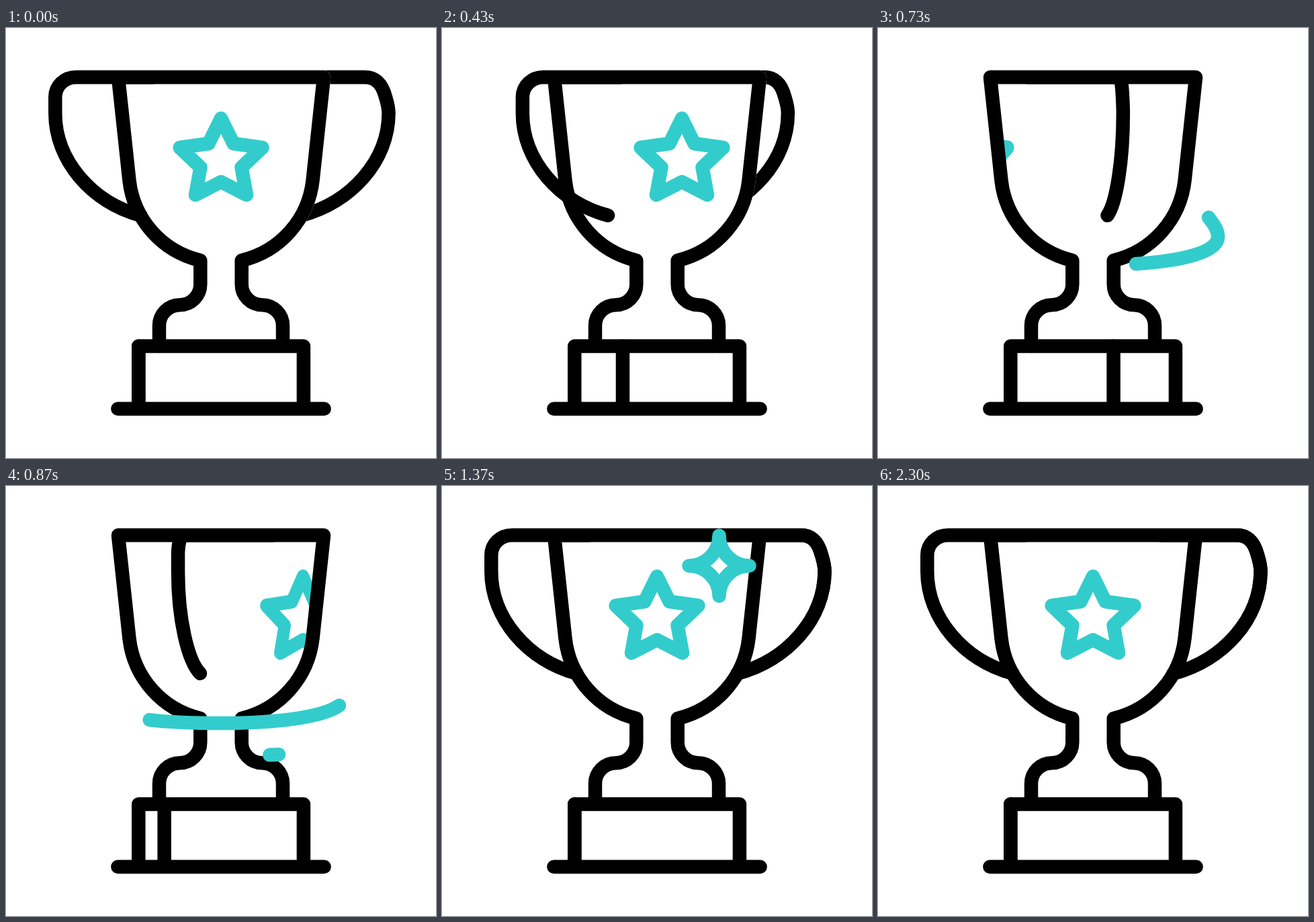
Recreate the animation shown at these times as an HTML page with a canvas. Size 640 by 640 pixels, loop 2.5 s.

```html
<!DOCTYPE html>
<html lang="en">
<head>
<meta charset="utf-8">
<title>Spinning trophy</title>
<style>
html, body { margin: 0; width: 100%; height: 100%; overflow: hidden; background: #fff; }
canvas { display: block; width: 100vmin; height: 100vmin; }
</style>
</head>
<body>
<canvas id="stage" width="640" height="640"></canvas>
<script>
const ctx = document.getElementById('stage').getContext('2d');
const BLACK = '#000', TEAL = '#33cccc', WHITE = '#fff';
const LOOP = 2500, FPS = 30;

// Eased progress of frame f between frames a and b
function ease(f, a, b) {
  const u = Math.min(1, Math.max(0, (f - a) / (b - a)));
  return u * u * (3 - 2 * u);
}
const mix = (a, b, p) => a + (b - a) * p;

const cup = new Path2D(
  'M228 473V443A30.7 30.7 0 0 1 258.6 412.3A30.7 30.7 0 0 0 289.3 381.6V346' +
  'C231 332 190 284 183.5 227L167 73.3H473L456.5 227C450 284 409 332 350.7 346' +
  'V381.6A30.7 30.7 0 0 0 381.4 412.3A30.7 30.7 0 0 1 412 443V473');
const base = new Path2D('M197.3 566.8V473.5H442.9V566.8M166.4 566.8H473.6');
const star = new Path2D(
  'M0 134.5L18.5 172L61.5 178L30.5 207.5L38 248.5L0 229' +
  'L-38 248.5L-30.5 207.5L-61.5 178L-18.5 172Z');
const sparkle = new Path2D(
  'M0 -45A45 45 0 0 0 45 0A45 45 0 0 0 0 45A45 45 0 0 0 -45 0A45 45 0 0 0 0 -45Z');

// Handle poses: x of each point, all sharing the same heights
const handleY = [73.3, 73.3, 73.3, 86, 103, 111, 119, 127, 197, 260, 279];
const leftX = [219, 104, 87, 73.3, 73.3, 73.3, 73.3, 73.3, 73.3, 128, 200.5];
const rightX = [421, 534, 553, 560.5, 565, 567.5, 569.5, 569.5, 569.5, 514, 439.5];
const midX = start => handleY.map((_, i) => i ? 320 : start);

const shift = (xs, d) => xs.map(x => x + d);
const blend = (a, b, p) => a.map((x, i) => mix(x, b[i], p));

function trail(d) {
  const el = document.createElementNS('http://www.w3.org/2000/svg', 'path');
  el.setAttribute('d', d);
  return { path: new Path2D(d), len: el.getTotalLength() };
}
const upper = trail('M492 282C503 296 506 303 506 311C506 340 420 353 320 353' +
  'C215 353 130 342 130 315C130 308 133 302 140 296L148 290');
const lower = trail('M406 399.5Q320 405 234 399.5');

function stroke(path, color) {
  ctx.strokeStyle = color;
  ctx.stroke(path);
}

function drawHandle(xs) {
  const at = i => [xs[i], handleY[i]];
  const p = new Path2D();
  p.moveTo(...at(0));
  p.lineTo(...at(1));
  for (let i = 2; i < 11; i += 3) p.bezierCurveTo(...at(i), ...at(i + 1), ...at(i + 2));
  stroke(p, BLACK);
}

function drawTrail(t, from, to) {
  if (to - from < 0.002) return;
  ctx.save();
  ctx.setLineDash([(to - from) * t.len, t.len * 3]);
  ctx.lineDashOffset = -from * t.len;
  stroke(t.path, TEAL);
  ctx.restore();
}

// Small twist to the right, then a half turn to the left
function pose(f) {
  const twist = ease(f, 7, 12) - ease(f, 12, 17);
  const p = {
    front: shift(leftX, 52 * twist),
    back: shift(rightX, -61 * twist),
    star: 41.3 * twist,
    squash: 1,
    bar: 197.3 + 80 * twist
  };
  if (f < 17 || f >= 30) return p;

  const out = ease(f, 16.6, 24), back = ease(f, 24, 30);
  if (f < 24) {
    p.front = blend(rightX, midX(180), out);
    p.back = shift(leftX, 154 * out);
  } else {
    p.front = blend(midX(460), leftX, back);
    p.back = shift(rightX, -154 * (1 - back));
  }
  p.star = f < 23 ? -256 * ((f - 17) / 6) ** 2 : 244 * (1 - ease(f, 23, 29));
  p.squash = 1 - 0.0009 * Math.abs(p.star);
  p.bar = mix(442.9, 197.3, ease(f, 17, 29));
  return p;
}

function draw(f) {
  const p = pose(f);
  ctx.fillStyle = WHITE;
  ctx.fillRect(0, 0, 640, 640);
  ctx.lineWidth = 20.5;
  ctx.lineCap = ctx.lineJoin = 'round';

  drawHandle(p.back);
  ctx.fill(cup);
  stroke(cup, WHITE);

  ctx.save();
  ctx.clip(cup);
  ctx.translate(320 + p.star, 0);
  ctx.scale(p.squash, 1);
  stroke(star, TEAL);
  ctx.restore();

  stroke(cup, BLACK);
  if (f >= 40) drawHandle(p.back);
  drawHandle(p.front);

  stroke(base, BLACK);
  stroke(new Path2D(`M${p.bar} 473.5V566.8`), BLACK);

  drawTrail(upper, ease(f, 23.5, 35.5), ease(f, 15.5, 31.5));
  drawTrail(lower, ease(f, 31, 39), ease(f, 24, 35.5));

  const size = ease(f, 34, 41) - ease(f, 62, 69);
  if (size > 0) {
    ctx.save();
    ctx.translate(412.5, 118.8);
    ctx.scale(size, size);
    stroke(sparkle, TEAL);
    ctx.restore();
  }
}

const began = performance.now();
function tick() {
  const t = (performance.now() - began) % LOOP;
  draw(Math.floor(t * FPS / 1000 + 0.12) % 75);
  requestAnimationFrame(tick);
}
tick();
</script>
</body>
</html>
```
